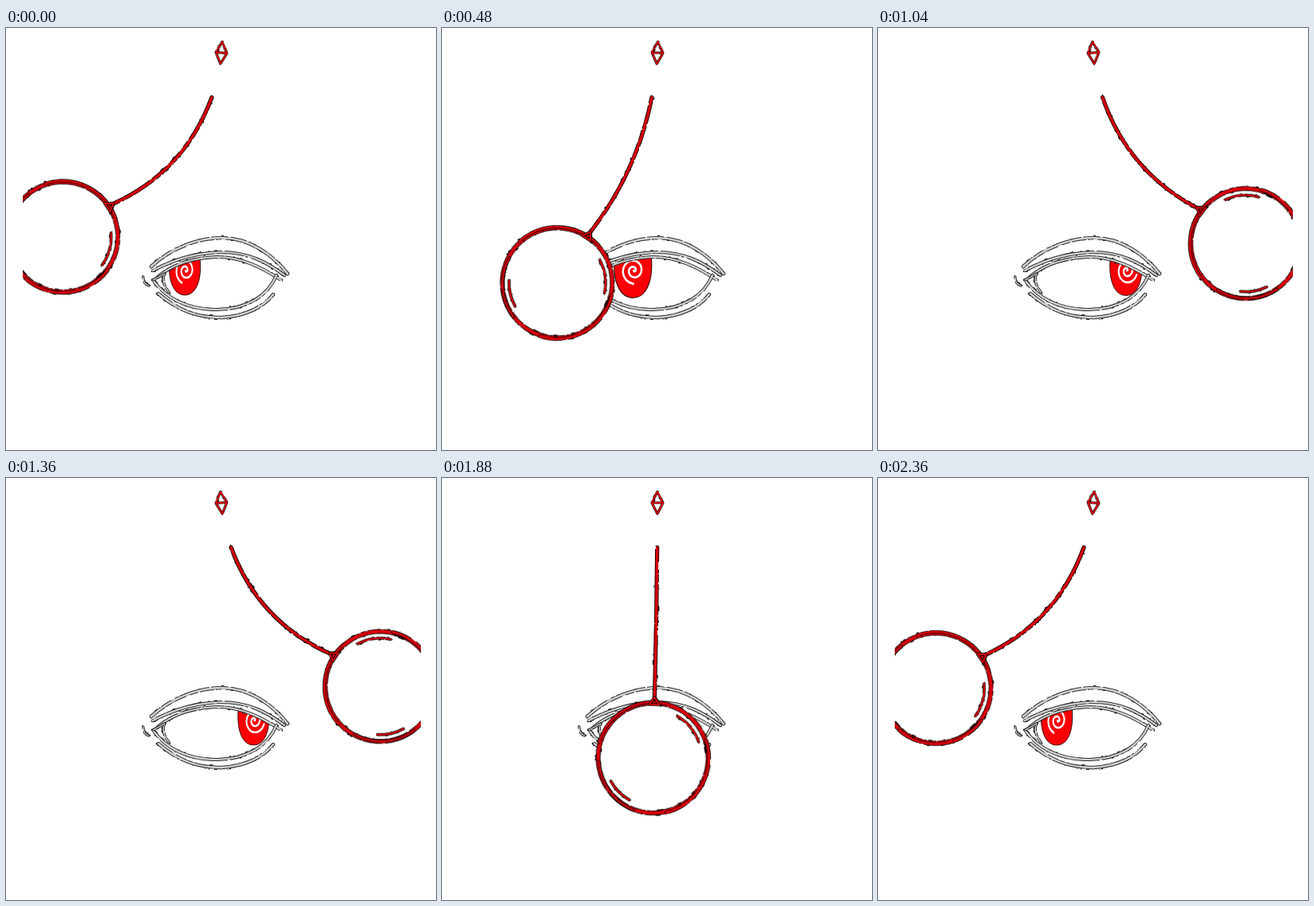
Animation of 539x529 px, one loop 2.4 s. Source, as an HTML page:

```html
<!DOCTYPE html>
<html lang="en">
<head>
<meta charset="utf-8">
<title>Pendulum and eye</title>
<style>
  html, body { margin: 0; width: 100%; height: 100%; overflow: hidden; background: #fff; }
  svg { display: block; width: 539px; height: 529px; }
  path, circle { fill: none; stroke-linecap: round; stroke-linejoin: round; }
  .edge { stroke: #180002; filter: url(#rough); }
  .red { stroke: #d4000c; }
  .lid .edge { stroke: #2a2a2a; }
  .lid .core { stroke: #d2d2d2; }
</style>
</head>
<body>
<svg viewBox="0 0 539 529">
  <defs>
    <filter id="rough" filterUnits="userSpaceOnUse" x="-100" y="-100" width="740" height="730" color-interpolation-filters="sRGB">
      <feTurbulence type="fractalNoise" baseFrequency=".13" numOctaves="2" seed="4"/>
      <feDisplacementMap in="SourceGraphic" scale="2.6" xChannelSelector="R" yChannelSelector="G"/>
    </filter>
    <clipPath id="opening">
      <path d="M186 316C204 298 232 289 265 288C296 288 322 302 342 316C330 342 300 354 265 354C232 354 204 342 186 316Z"/>
    </clipPath>
    <clipPath id="window"><rect x="21" y="0" width="499" height="529"/></clipPath>
  </defs>

  <g clip-path="url(#opening)">
    <path id="iris" d="M-25 -28C-28 5 -18 27 0 27S28 5 25 -28Z" style="fill:#fa0006;stroke:#300;stroke-width:1.2"/>
    <path id="spiral" stroke="#fff" stroke-width="2.7"/>
  </g>
  <g id="lids" class="lid"></g>
  <g id="gem"></g>
  <g id="string"></g>
  <g clip-path="url(#window)">
    <g id="ring"><circle r="68" style="fill:#fff"/></g>
  </g>
</svg>
<script>
const LOOP = 2400, STEP = 40, SWING = 51, EASE = 265;
const RIGHTWARD = 645, LEFTWARD = 1874;
const PIVOT = { x: 270, y: 85 }, LENGTH = 266, KNOT = 74;
const RAD = Math.PI / 180;
const $ = id => document.getElementById(id);

function add(parent, d, cls, width) {
  const p = document.createElementNS('http://www.w3.org/2000/svg', 'path');
  p.setAttribute('d', d);
  p.setAttribute('class', cls);
  p.setAttribute('stroke-width', width);
  return parent.appendChild(p);
}

// A rough dark line with a lighter line on top.
function ink(parent, d, width, core, rim = 1.5) {
  return [add(parent, d, 'edge', width), add(parent, d, core, width - rim)];
}

function arc(r, from, to, ry = r) {
  const at = a => `${r * Math.cos(a * RAD)} ${ry * Math.sin(a * RAD)}`;
  return `M${at(from)}A${r} ${ry} 0 ${to - from > 180 ? 1 : 0} 1 ${at(to)}`;
}

[
  ['M182 299C207 276 240 263 272 263C306 264 334 284 353 308', 4.6],
  ['M184 304C215 288 240 282 270 281C304 281 328 294 349 310', 4.2],
  ['M186 316C204 298 232 288 265 287C296 287 322 301 345 316', 4.2],
  ['M184 316C203 342 230 353 265 353C303 352 328 336 339 310', 4.2],
  ['M191 333C214 353 238 363 270 363C300 361 322 350 335 334', 4.4],
  ['M199 308C195 315 198 324 204 331', 3.4],
  ['M184 316L199 308', 3.4],
  ['M172 312Q172 321 179 323', 3.2]
].forEach(([d, w]) => ink($('lids'), d, w, 'core', 2));

ink($('gem'), 'M0 -14L7 0L0 14L-7 0ZM-6 0H6', 3, 'red', 1.2);

const ring = $('ring');
ink(ring, arc(69, -90, 269.9), 6, 'red', 1.8);
ink(ring, arc(70.5, -165, -75, 70), 4, 'red');
ink(ring, arc(70, -20, 75, 70.5), 4.5, 'red');
ink(ring, arc(68, 110, 175, 70), 3.5, 'red');
ink(ring, arc(60.5, -61, -21), 3.6, 'red');
ink(ring, arc(60.5, 118, 150), 3.6, 'red');
ink(ring, 'M-6 -67L0 -76L6 -67Z', 3.4, 'red');

const string = ink($('string'), '', 5.2, 'red', 1.8);

let curl = 'M0 0';
for (let a = 0; a <= 700; a += 20) {
  const r = 1 + a / 45;
  curl += `L${(r * Math.cos(a * RAD)).toFixed(1)} ${(-r * Math.sin(a * RAD)).toFixed(1)}`;
}
$('spiral').setAttribute('d', curl);

const ramp = (t, mid) => Math.tanh((t - mid) / EASE);

function swing(t) {
  let s = -1;
  for (const shift of [-LOOP, 0, LOOP])
    s += ramp(t, RIGHTWARD + shift) - ramp(t, LEFTWARD + shift);
  return SWING * s;
}

function draw(t) {
  const deg = swing(t), a = deg * RAD, turn = deg * 1.17;
  const cx = PIVOT.x + LENGTH * Math.sin(a), cy = PIVOT.y + LENGTH * Math.cos(a);
  ring.setAttribute('transform', `translate(${cx} ${cy}) rotate(${-turn})`);

  const x0 = PIVOT.x + deg * .25, y0 = 87;
  const x1 = cx - KNOT * Math.sin(turn * RAD), y1 = cy - KNOT * Math.cos(turn * RAD);
  const dx = x1 - x0, dy = y1 - y0, bow = .8 * deg / Math.hypot(dx, dy);
  const d = `M${x0} ${y0}Q${(x0 + x1) / 2 - dy * bow} ${(y0 + y1) / 2 + dx * bow} ${x1} ${y1}`;
  string.forEach(p => p.setAttribute('d', d));

  $('gem').setAttribute('transform', `translate(270 31) rotate(${-deg * .1})`);

  // The iris narrows as it looks aside, and runs ahead on the way right.
  const q = (deg / 48) ** 2, lead = 8 * (1 - ramp(t, RIGHTWARD) ** 2);
  const ex = 267 + 48 * Math.tanh(deg / 33) + lead, sx = 1 - .23 * q;
  $('iris').setAttribute('transform', `translate(${ex} 313) scale(${sx} ${1 - .19 * q})`);
  $('spiral').setAttribute('transform',
    `translate(${ex + 1} 304) scale(${sx} 1) rotate(${44 - deg})`);
}

const start = performance.now();
function tick() {
  const t = (performance.now() - start) % LOOP;
  draw(Math.floor(t / STEP) * STEP);
  requestAnimationFrame(tick);
}
tick();
</script>
</body>
</html>
```
